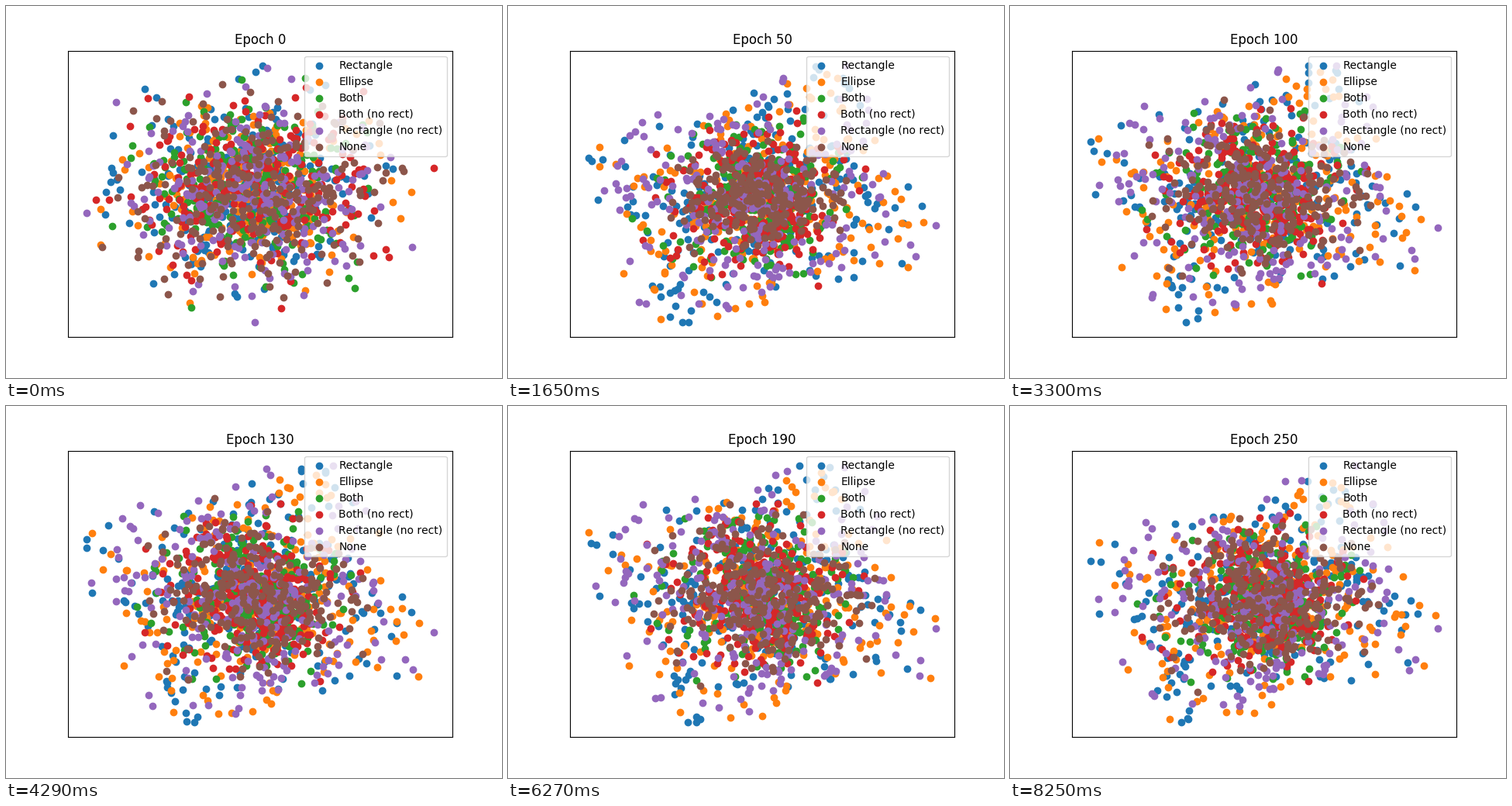
Recreate the animation shown at these times as a matplotlib script. Size 640 by 480 pixels, loop 8580 ms.

```python
import matplotlib.pyplot as plt
import numpy as np
from matplotlib.animation import FuncAnimation

STEPS, INTERVAL = 26, 330
COUNT = 240  # points per class
LABELS = ["Rectangle", "Ellipse", "Both", "Both (no rect)",
          "Rectangle (no rect)", "None"]
CENTER = np.array([328, 254])
LOW, HIGH = np.array([104, 77]), np.array([552, 408])  # autoscaled extent
rng = np.random.default_rng(12)


def blob(spread, limit):
    """Gaussian cloud around the center, without its far tail."""
    p = rng.normal(size=(2 * COUNT, 2))
    p = p[np.hypot(*p.T) < limit][:COUNT]
    return CENTER + p * spread


def star():
    """Wide cloud with four lobes, densest in the middle."""
    angle = rng.uniform(0, 2 * np.pi, COUNT)
    edge = 0.9 + 0.2 * np.cos(4 * (angle - np.radians(25)))
    radius = edge * rng.uniform(0, 1, COUNT)
    direction = np.stack([np.cos(angle), np.sin(angle)], axis=1)
    return CENTER + radius[:, None] * direction * (225, 158)


both = blob((56, 41), 2.7)
both_no_rect = both + rng.normal(0, 9, both.shape)
trained = np.array([star(), star(), both, both_no_rect, star(),
                    blob((60, 46), 2.7)])
untrained = np.array([blob((68, 50), 3.3) for _ in LABELS])
walk = rng.normal(0, 2.5, (STEPS,) + trained.shape).cumsum(axis=0)


def positions(step):
    p = trained + walk[step]

    # The last class starts compact and opens up
    grown = np.clip((step - 3) / 5, 0, 1)
    size = np.array([0.64, 0.46]) * (1 - grown) + grown
    p[-1] = CENTER + (p[-1] - CENTER) * size

    # The whole cloud sways slowly
    sway = np.sin(np.pi * (step - 10) / 12)
    u, v = ((p - CENTER) / (225, 158)).transpose(2, 0, 1)
    p[..., 0] += 9 * sway * v
    p[..., 1] += 7 * sway * u

    mix = 1 - (1 - min(step / 3, 1)) ** 3
    p = untrained + (p - untrained) * mix
    lo, hi = p.min(axis=(0, 1)), p.max(axis=(0, 1))
    return LOW + (p - lo) / (hi - lo) * (HIGH - LOW)


plt.rcParams["text.kerning_factor"] = 6
fig, ax = plt.subplots(figsize=(6.4, 4.8), dpi=100)
ax.set(xlim=(80, 576), ylim=(427.2, 57.6), xticks=[], yticks=[])
clouds = [ax.scatter(*p.T, label=name)
          for p, name in zip(positions(0), LABELS)]
title = ax.set_title("Epoch 0")
ax.legend(loc="upper right")


def draw(step):
    for cloud, p in zip(clouds, positions(step)):
        cloud.set_offsets(p)
    title.set_text(f"Epoch {10 * step}")
    return clouds + [title]


anim = FuncAnimation(fig, draw, frames=STEPS, interval=INTERVAL,
                     repeat=True, repeat_delay=0)
plt.show()
```
